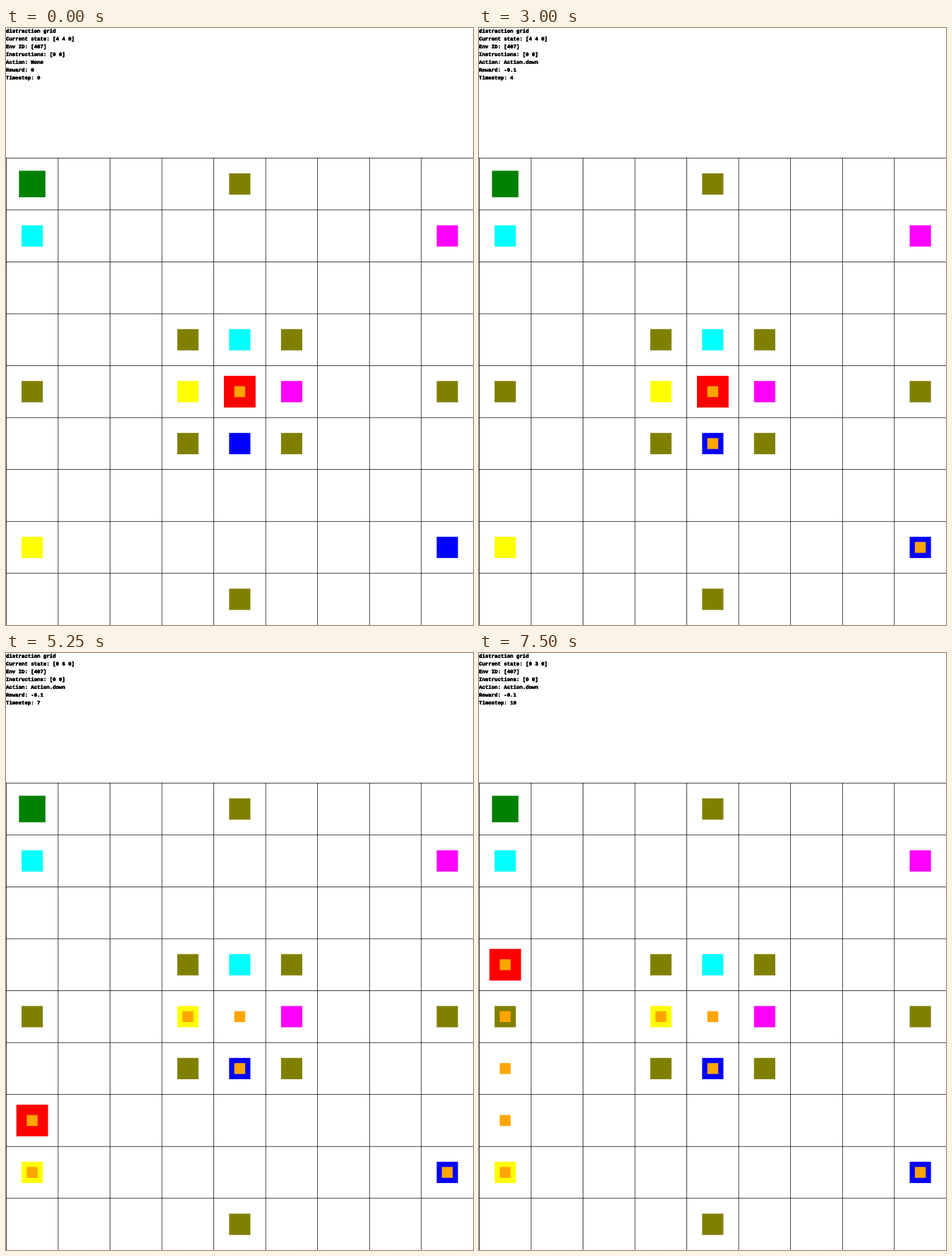
These frames come from a looping animation (662x846 px, 8 s). A matplotlib script:

```python
import matplotlib.pyplot as plt
from matplotlib.animation import FuncAnimation
from matplotlib.patches import Rectangle
from matplotlib.patheffects import withStroke

W, H, DPI = 662, 846, 100
WORLD_W, WORLD_H = 900, 1150    # drawing units, shown scaled to the stage
CELL, TOP, SIZE = 100, 250, 9
LINE_STEP, BASELINE, CHAR_EM = 15, 9, 10
TICKS_PER_STEP, TICK_MS, TICKS = 3, 250, 32

plt.rcParams["toolbar"] = "None"

# Action, then state (column, row, at a marked cell) after it.
STEPS = [
    ("None", (4, 4, 0)),
    ("Action.up", (4, 5, 1)),
    ("Action.ride_bus", (8, 7, 1)),
    ("Action.ride_bus", (4, 5, 1)),
    ("Action.down", (4, 4, 0)),
    ("Action.left", (3, 4, 1)),
    ("Action.ride_bus", (0, 7, 1)),
    ("Action.down", (0, 6, 0)),
    ("Action.down", (0, 5, 0)),
    ("Action.down", (0, 4, 1)),
    ("Action.down", (0, 3, 0)),
]

STOPS = {
    "cyan": [(0, 1), (4, 3)],
    "magenta": [(8, 1), (5, 4)],
    "yellow": [(0, 7), (3, 4)],
    "blue": [(8, 7), (4, 5)],
    "olive": [(4, 0), (3, 3), (5, 3), (0, 4), (8, 4), (3, 5), (5, 5), (4, 8)],
}

fig = plt.figure(figsize=(W / DPI, H / DPI), dpi=DPI, facecolor="white")
ax = fig.add_axes([0, 0, 1, 1])
ax.set_xlim(0, WORLD_W)
ax.set_ylim(WORLD_H, 0)
ax.axis("off")


def box(x, y, w, h, color, z):
    patch = Rectangle((x, y), w, h, facecolor=color, linewidth=0,
                      snap=False, zorder=z)
    return ax.add_patch(patch)


def corner(col, row, side):
    inset = (CELL - side) / 2
    return col * CELL + inset, TOP + row * CELL + inset


def square(col, row, side, color, z):
    # Both end units belong to the square.
    return box(*corner(col, row, side), side + 1, side + 1, color, z)


for k in range(SIZE):
    box(k * CELL, TOP, 1, WORLD_H - TOP, "black", 1)
    box(0, TOP + k * CELL, WORLD_W, 1, "black", 1)

square(0, 0, 50, "green", 2)
for color, cells in STOPS.items():
    for col, row in cells:
        square(col, row, 40, color, 4)

agent = square(4, 4, 60, "red", 3)
trail = [square(col, row, 20, "orange", 5) for _, (col, row, _) in STEPS]

points = CHAR_EM * W / WORLD_W * 72 / DPI
lines = [
    ax.text(0, BASELINE + LINE_STEP * k, "", family="Liberation Mono",
            weight="bold", size=points, color="black",
            va="baseline", ha="left",
            path_effects=[withStroke(linewidth=0.3, foreground="black")])
    for k in range(7)
]


def update(tick):
    step = min(tick // TICKS_PER_STEP, len(STEPS) - 1)
    action, (col, row, flag) = STEPS[step]
    agent.set_xy(corner(col, row, 60))
    for k, mark in enumerate(trail):
        # A revisited cell keeps its first mark only.
        seen = [state for _, state in STEPS[:k]]
        mark.set_visible(k <= step and STEPS[k][1] not in seen)
    texts = [
        "distraction grid",
        f"Current state: [{col} {row} {flag}]",
        "Env ID: [407]",
        "Instructions: [0 0]",
        f"Action: {action}",
        f"Reward: {-0.1 if step else 0}",
        f"Timestep: {step}",
    ]
    for line, text in zip(lines, texts):
        line.set_text(text)
    return [agent, *trail, *lines]


anim = FuncAnimation(fig, update, frames=TICKS, interval=TICK_MS,
                     init_func=lambda: update(0), repeat=True,
                     repeat_delay=0, blit=False)
plt.show()
```
